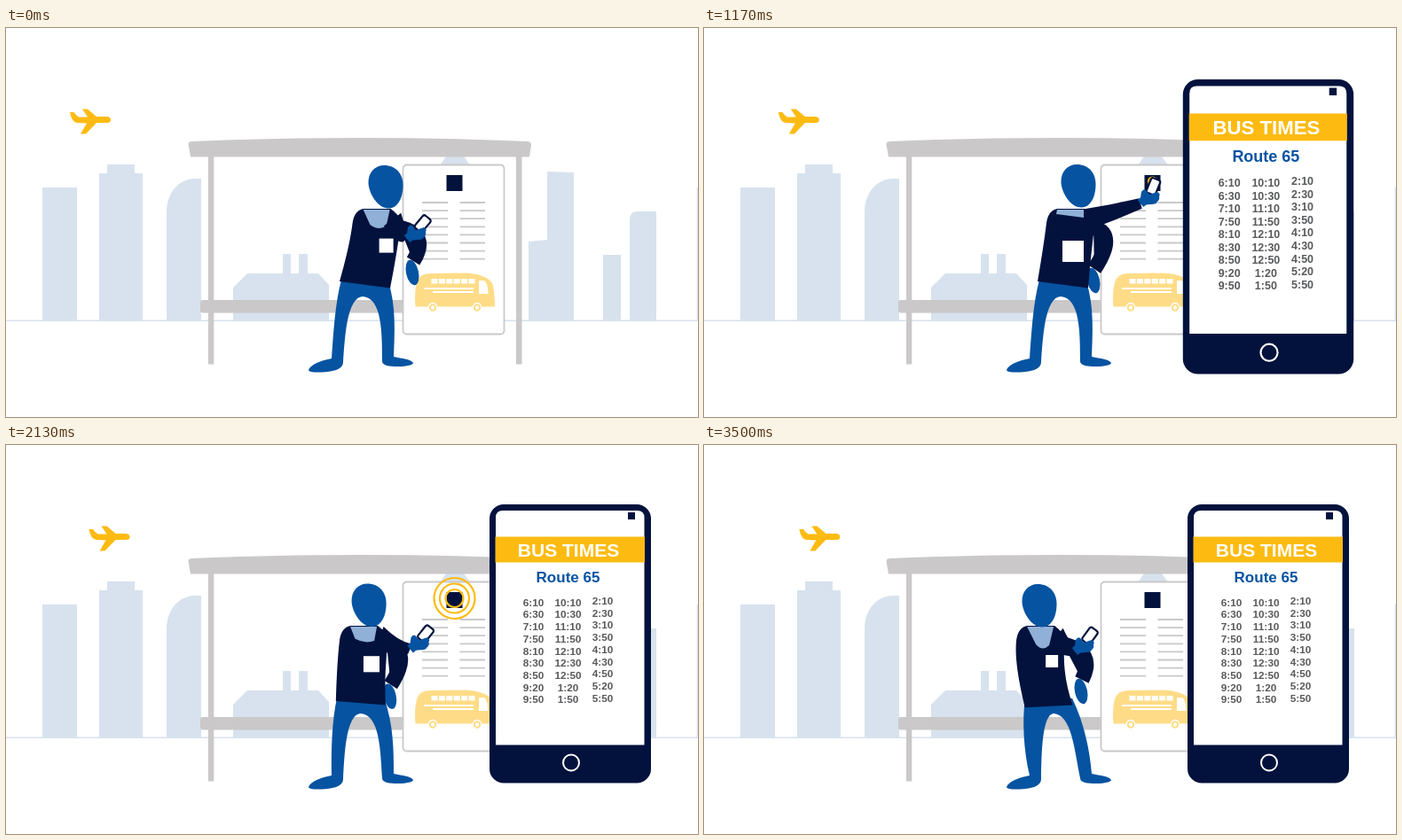
These frames come from a looping animation (780 by 439 pixels, 3.54 s). An HTML page:

```html
<!DOCTYPE html>
<html lang="en">
<head>
<meta charset="utf-8">
<title>Bus stop</title>
<style>
  html, body { margin: 0; width: 100%; height: 100%; overflow: hidden; background: #fff; }
  svg { display: block; width: 780px; height: 439px; }
  text { font-family: "Liberation Sans", Arial, sans-serif; font-weight: bold; text-anchor: middle; }
  .sky { fill: #d7e2ee; }
  .gray { fill: #cac8c8; }
  .line { fill: none; stroke: #cac8c8; stroke-width: 1.8; }
  .navy { fill: #02123d; }
  .blue { fill: #0653a1; }
  .gold { fill: #fdbb12; }
  .pale { fill: #fedc87; }
  .white { fill: #fff; }
</style>
</head>
<body>
<svg viewBox="0 0 780 439">
  <g class="sky">
    <path d="M0 329.5H780V331H0Z"/>
    <path d="M41 180H80V330H41Z"/>
    <path d="M105 330V164H114V154H145V164H154V330Z"/>
    <path d="M181 330V205C182 186 194 171 212 170H220V330Z"/>
    <path d="M256 330V293L272 277H312V255H321V277H330V255H340V277H352L364 290V330Z"/>
    <path d="M489 155L496 145H516L523 155Z"/>
    <path d="M589 330V241L610 239V162L640 163V330Z"/>
    <path d="M673 256H693V330H673Z"/>
    <path d="M703 330V215Q704 207 711 207H733V330Z"/>
    <path d="M778.7 180H780V330H778.7Z"/>
  </g>

  <g class="gray">
    <path d="M228 144H234.3V379.5H228Z"/>
    <path d="M575 144H581.5V379.5H575Z"/>
    <rect x="219" y="307" width="240" height="14.5" rx="3"/>
    <path d="M205.5 131Q205.5 128 210 128Q400 120 588 128Q592 128.5 592 132L590 145.500H208Z"/>
  </g>

  <g>
    <rect class="line" x="447.5" y="154.5" width="114" height="191" rx="4" style="fill:#fff"/>
    <path class="line" id="rows"/>
    <path class="pale" d="M461.500 314.500Q460 298 463 287Q466 277 478 277L518 276.500Q543 278 548.500 289Q551 299 551 314.500Z"/>
    <g class="white">
      <path d="M471 293H527V295H471ZM481 297H527V299H481Z"/>
      <path d="M533 285H539Q543 287 543.5 300H533Z"/>
      <path id="panes"/>
      <circle cx="481" cy="315" r="5.200"/><circle cx="531" cy="315" r="5.200"/>
    </g>
    <g fill="none" stroke="#fedc87" stroke-width="2">
      <circle cx="481" cy="315.5" r="3.200"/><circle cx="531" cy="315.5" r="3.200"/>
    </g>
    <rect class="navy" x="496.5" y="166" width="18" height="18"/>
  </g>
  <g id="rings" fill="none" stroke="#fdbb12" stroke-width="2.200"></g>

  <path id="plane" class="gold" d="M72 95H76.500Q79 99 82 100.500H92L86 91.500H92L102 100H114Q118 100.500 118 103.700Q118 107 114 107H102L90 119.500H84L91 107.500L80 107Q74 106 72 95Z"/>

  <g>
    <path id="legs" class="blue"/>
    <ellipse id="restHand" class="blue" rx="7" ry="14.500"/>
    <path id="restArm" class="navy" stroke="#02123d" stroke-width="17" stroke-linejoin="round"/>
    <path id="torso" class="navy"/>
    <rect id="badge" class="white"/>
    <path id="collar" fill="#90b0d7"/>
    <path id="sleeve" class="navy"/>
    <rect id="mobile" x="-5.500" y="-21" width="11" height="18" rx="2.500" fill="#fff" stroke="#02123d" stroke-width="2.200"/>
    <path id="wrist" fill="none" stroke="#0653a1" stroke-width="10.500"/>
    <path id="palm" class="blue" d="M-11 8L-9 -5Q-6 -10 -3 -6L0 -2L9 -5Q13 -3 11 0Q12 4 9 6Q8 9 3 9L-6 9.500Z"/>
    <path id="head" class="blue" d="M-2 -24C12 -24 20 -14 19.500 0C19 14 13 24.500 3 24.500C-9 24.500 -19 8 -19.500 -4C-20 -16 -12 -24 -2 -24Z"/>
  </g>

  <g id="screen">
    <rect class="navy" x="545" y="67" width="182" height="314.500" rx="16"/>
    <path class="white" d="M552 338.500V82Q552 74 560 74H711.500Q719.500 74 719.500 82V338.500Z"/>
    <path class="gold" d="M551.500 103.500H720V132.500H551.500Z"/>
    <rect class="navy" x="701" y="76" width="8" height="8"/>
    <circle cx="637" cy="358.500" r="9" fill="none" stroke="#fff" stroke-width="2"/>
    <text class="white" x="634" y="125.500" font-size="21">BUS TIMES</text>
    <text class="blue" x="633.500" y="155.400" font-size="17">Route 65</text>
    <g id="times" fill="#58595b" font-size="11.800"></g>
  </g>
</svg>
<script>
const LOOP = 3540;
const $ = id => document.getElementById(id);
const set = (id, attrs) => {
  for (const k in attrs) $(id).setAttribute(k, attrs[k]);
};
const clamp = x => Math.max(0, Math.min(1, x));
const easeOut = u => 1 - (1 - u) ** 2;
const easeInOut = u => u * u * (3 - 2 * u);
const range = n => [...Array(n).keys()];

// Key poses: time, head x y, turn (0 back, 1 front), phone hand x y tilt, resting hand x y
const poses = [
  [0, 428, 179, .8, 462, 230, 40, 458, 276],
  [380, 421, 178, .5, 462, 218, 20, 439, 285],
  [830, 422, 178, 0, 472, 180, 4, 439, 285],
  [1170, 422, 178, 0, 502, 190, 22, 439, 285],
  [1450, 422, 178, 0, 502, 190, 22, 439, 285],
  [1880, 422, 180, .3, 488, 219, 40, 437, 286],
  [2580, 378, 181, 1, 428, 225, 36, 425, 278]
];

// Smooth interpolation that never overshoots a pose.
function poseAt(t) {
  const last = poses.length - 1;
  if (t >= poses[last][0]) return poses[last].slice(1);
  const i = poses.findIndex(p => p[0] > t) - 1;
  const span = poses[i + 1][0] - poses[i][0], u = (t - poses[i][0]) / span, v = 1 - u;
  const rate = (k, j) => (poses[k + 1][j] - poses[k][j]) / (poses[k + 1][0] - poses[k][0]);
  const slope = (k, j) => {
    if (k === 0 || k === last) return 0;
    const a = rate(k - 1, j), b = rate(k, j);
    return a * b > 0 ? 2 * a * b / (a + b) : 0;
  };
  return poses[i].map((a, j) => a * v * v * (1 + 2 * u) + poses[i + 1][j] * u * u * (3 - 2 * u)
    + span * u * v * (v * slope(i, j) - u * slope(i + 1, j))).slice(1);
}

// Sleeve from shoulder to wrist; the elbow sags more when the arm is short.
function sleeve(sx, sy, wx, wy) {
  const d = Math.hypot(wx - sx, wy - sy), nx = (sy - wy) / d, ny = (wx - sx) / d;
  const ex = (sx + wx) / 2, ey = (sy + wy) / 2 + (70 - d) * .2;
  return `M${sx + nx * 12} ${sy + ny * 12}Q${ex + nx * 9} ${ey + ny * 9} ${wx + nx * 6} ${wy + ny * 6}`
    + `L${wx - nx * 6} ${wy - ny * 6}Q${ex - nx * 9} ${ey - ny * 9} ${sx - nx * 12} ${sy - ny * 12}Z`;
}

// The feet stay put; the closer a point is to the waist, the more it follows the hip.
function legs(h) {
  const foot = 'C355 375 343 380 341 386C342 389 352 389 362 388C372 387 380 384 380 377';
  const toe = 'C424 381 432 382 442 382C452 382 459 380 459 378C457 374 447 373 437 371';
  return `M${378 + h} 284C${371 + h * .8} 310 ${369 + h * .55} 345 367 373` + foot
    + `C${382 + h * .1} 350 ${384 + h * .2} 304 ${402 + h * .5} 303`
    + `C${424 + h * .6} 304 ${424 + h * .4} 345 424 376` + toe
    + `C${438 + h * .2} 345 ${440 + h * .7} 315 ${431 + h} 286Z`;
}

function torso(n, h) {
  return `M${n - 15} 204Q${n - 25} 206 ${n - 27} 220Q${n - 30} 245 ${376 + h * .9} ${286 - h * .65}`
    + `L${433 + h * 1.1} 293.5Q${n + 23} 255 ${n + 28} 217Q${n + 24} 210 ${n + 16} 204Z`;
}

function collar(n, turn) {
  const lx = n - 16 + turn * 11, ly = 210 + turn * 15, rx = n + 15 - turn * 5, ry = 214 + turn * 12;
  return `M${n - 15} 205L${n + 15} 205L${rx} ${ry}Q${(lx + rx) / 2} ${(ly + ry) / 2 + turn * 8} ${lx} ${ly}Z`;
}

function screenScale(t) {
  const peak = 1.062;
  if (t < 1190) return peak * easeOut(clamp((t - 910) / 280));
  return peak + (1 - peak) * easeInOut(clamp((t - 1190) / 180));
}

function draw(t) {
  const [headX, headY, turn, px, py, tilt, rx, ry] = poseAt(t);
  const neck = 413 + (headX - 422) * .77;
  const hip = Math.min(0, headX - 422) * .36;

  set('plane', { transform: `translate(${t * .0101} 0)` });
  set('head', { transform: `translate(${headX} ${headY})` });
  set('legs', { d: legs(hip) });
  set('torso', { d: torso(neck, hip) });
  set('collar', { d: collar(neck, turn) });
  const size = 24 - turn * 10;
  set('badge', {
    x: neck + 3 + turn * 10 - size / 2, y: 252 - turn * 8 - size / 2, width: size, height: size
  });

  set('sleeve', { d: sleeve(neck + 18, 216, px - 10, py + 8) });
  set('wrist', { d: `M${px - 10} ${py + 8}L${px} ${py}` });
  set('palm', { transform: `translate(${px} ${py})` });
  set('mobile', { transform: `translate(${px} ${py}) rotate(${tilt})` });

  const sx = neck + 26;
  set('restArm', { d: `M${sx} 225Q${(sx + rx) / 2 + 27} 233 ${rx + 1} ${ry - 13}` });
  set('restHand', { transform: `translate(${rx} ${ry}) rotate(-12)` });

  rings.forEach((ring, i) => {
    const u = clamp((t - 1120 - 130 * i) / 200);
    ring.setAttribute('r', (10 + 6.5 * i) * easeOut(u));
    ring.setAttribute('visibility', u > 0 && t < 2350 ? 'visible' : 'hidden');
  });
  $('rings').setAttribute('opacity', 1 - clamp((t - 2150) / 200));

  const s = screenScale(t);
  set('screen', {
    transform: `translate(636 224) scale(${s}) translate(-636 -224)`,
    visibility: s > 0 ? 'visible' : 'hidden'
  });
}

set('rows', { d: range(8).map(i => `M469 ${197 + 9.1 * i}h29m13.5 0h28.5`).join('') });
set('panes', { d: range(6).map(i => `M${479.5 + 8.4 * i} 283h7v5.5h-7Z`).join('') });
$('rings').innerHTML = '<circle cx="505.5" cy="173"/>'.repeat(3);
const rings = [...$('rings').children];

const columns = [
  '6:10 6:30 7:10 7:50 8:10 8:30 8:50 9:20 9:50',
  '10:10 10:30 11:10 11:50 12:10 12:30 12:50 1:20 1:50',
  '2:10 2:30 3:10 3:50 4:10 4:30 4:50 5:20 5:50'
];
$('times').innerHTML = columns.map((list, c) => list.split(' ').map((s, i) =>
  `<text x="${594.5 + 39 * c}" y="${(c < 2 ? 181.7 : 180) + 13.72 * i}">${s}</text>`).join('')).join('');

const start = performance.now();
function tick() {
  draw((performance.now() - start) % LOOP);
  requestAnimationFrame(tick);
}
tick();
</script>
</body>
</html>
```
